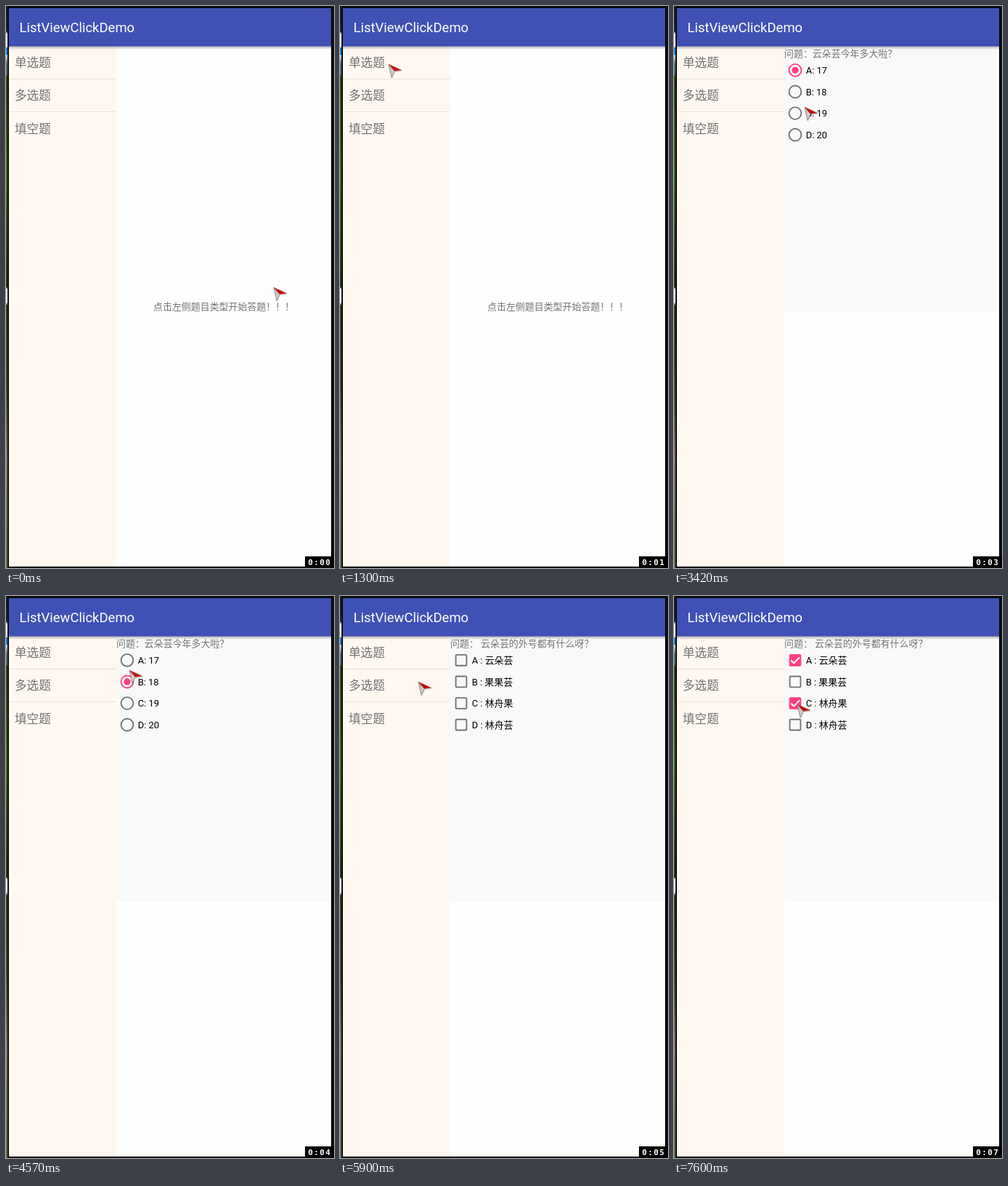
These frames come from a looping animation (452 by 773 pixels, 8 s). An HTML page:

```html
<!DOCTYPE html>
<html lang="zh-CN">
<head>
<meta charset="utf-8">
<title>ListViewClickDemo</title>
<style>
  html, body { margin: 0; width: 100%; height: 100%; overflow: hidden; background: #0b0c0f; }
  svg { display: block; }
  text { font: 12.94px Roboto, "Noto Sans CJK SC", sans-serif; fill: #737373; white-space: pre; }
  .mark { font-family: "Noto Sans CJK TC", "Noto Sans CJK SC", sans-serif; }
  .title { font-size: 18.48px; fill: #fff; }
  .item { font-size: 16.63px; }
  .option { fill: #000; }
  .clock { font: bold 11px "DejaVu Sans Mono", monospace; letter-spacing: 1.4px; fill: #fff; }
  .box { fill: none; stroke: #737373; stroke-width: 1.85; }
  .on .box { stroke: #ff4081; }
  .on .square { fill: #ff4081; }
  .dot { fill: #ff4081; }
  .tick { fill: none; stroke: #fff; stroke-width: 1.9; }
  .dot, .tick { visibility: hidden; }
  .on .dot, .on .tick { visibility: inherit; }
</style>
</head>
<body>
<svg id="stage" width="452" height="773" viewBox="0 0 452 773">
  <defs>
    <linearGradient id="desk" x2="0" y2="1">
      <stop offset="0" stop-color="#17191c"/>
      <stop offset=".045" stop-color="#22262a"/>
      <stop offset=".05" stop-color="#e8eef4"/>
      <stop offset=".073" stop-color="#e8eef4"/>
      <stop offset=".074" stop-color="#1584e0"/>
      <stop offset=".086" stop-color="#1584e0"/>
      <stop offset=".088" stop-color="#d5dde2"/>
      <stop offset=".103" stop-color="#54757a"/>
      <stop offset=".122" stop-color="#54757a"/>
      <stop offset=".125" stop-color="#2c4a08"/>
      <stop offset=".3" stop-color="#3c6a0c"/>
      <stop offset=".5" stop-color="#26380e"/>
      <stop offset=".504" stop-color="#f4f4f4"/>
      <stop offset=".527" stop-color="#f4f4f4"/>
      <stop offset=".533" stop-color="#30400f"/>
      <stop offset=".68" stop-color="#4a4a28"/>
      <stop offset=".8" stop-color="#8a7468"/>
      <stop offset="1" stop-color="#62704a"/>
    </linearGradient>
    <linearGradient id="shade" x2="0" y2="1">
      <stop offset="0" stop-opacity=".3"/>
      <stop offset="1" stop-opacity="0"/>
    </linearGradient>
    <linearGradient id="silver" x2="1" y2="0">
      <stop offset="0" stop-color="#b9b0b0"/>
      <stop offset="1" stop-color="#e6dede"/>
    </linearGradient>
  </defs>
  <rect width="2" height="773" fill="url(#desk)"/>
  <rect x="4" y="3" width="444" height="768" fill="#fefefe"/>
  <rect x="4" y="55" width="148" height="716" fill="#fef8f1"/>
  <path d="M4 100.5H152M4 145.5H152" stroke="#e9e3dc"/>
  <rect id="panel" x="152" y="55" width="296" height="365" fill="#f9f9f9"/>
  <rect x="4" y="55" width="444" height="5" fill="url(#shade)"/>
  <rect x="4" y="3" width="444" height="52.5" fill="#3f51b5"/>
  <text class="title" x="18.5" y="36.3">ListViewClickDemo</text>
  <g id="list"></g>
  <g id="intro"></g>
  <g id="single"></g>
  <g id="multi"></g>
  <circle id="ripple" cx="167" r="15"/>
  <g id="cursor">
    <path d="M0 0L18 8.5L8 10L4 19Z" fill="#000" opacity=".16" transform="translate(1 1)"/>
    <path d="M0 0L8 9.5L4 18.5Z" fill="url(#silver)" stroke="#8d7c7c" stroke-width=".8"/>
    <path d="M0 0L18 8.3L8 9.5Z" fill="#c00d0d" stroke="#b86a6a" stroke-width=".6"/>
  </g>
  <rect x="412" y="757" width="40" height="16" fill="#000"/>
  <text id="clock" class="clock" x="416.3" y="769">0:00</text>
</svg>
<script>
const $ = id => document.getElementById(id);
const LOOP = 8000;
const rowY = i => 88.3 + 29.6 * i;

// Full-width punctuation sits centred in its cell.
const label = (cls, x, y, text) =>
  `<text class="${cls}" x="${x}" y="${y}">` +
  text.replace(/[：！？]+/g, m => `<tspan class="mark">${m}</tspan>`) + '</text>';

const radio = '<circle class="box" r="8.4"/><circle class="dot" r="4.6"/>';
const check = '<rect class="box square" x="-7.4" y="-7.4" width="14.8" height="14.8" rx="1"/>' +
  '<path class="tick" d="M-5.8 .2L-1.9 4L5.9 -3.8"/>';

const quiz = (question, options, shape) => label('', 152, 70, question) +
  options.map((text, i) =>
    `<g class="row"><g transform="translate(167 ${rowY(i)})">${shape}</g>` +
    label('option', 181.7, rowY(i) + 4.8, text) + '</g>').join('');

$('list').innerHTML = ['单选题', '多选题', '填空题']
  .map((text, i) => label('item', 12, 84.2 + 45.2 * i, text)).join('');
$('intro').innerHTML = label('', 203, 418.4, '点击左侧题目类型开始答题！！！');
$('single').innerHTML = quiz('问题：云朵芸今年多大啦？',
  ['A: 17', 'B: 18', 'C: 19', 'D: 20'], radio);
$('multi').innerHTML = quiz('问题： 云朵芸的外号都有什么呀？',
  ['A : 云朵芸', 'B : 果果芸', 'C : 林舟果', 'D : 林舟芸'], check);

const times = [
  [0, 0, 1], [150, 1150, 9], [1300, 1300, 1], [1700, 2580, 8], [2730, 2730, 1],
  [2850, 3420, 5], [3540, 3840, 3], [3960, 4570, 6], [4690, 4930, 3],
  [5080, 5900, 6], [6020, 6120, 2], [6270, 7210, 8], [7330, 7600, 3]
].flatMap(([a, b, n]) =>
  Array.from({ length: n }, (_, i) => n > 1 ? a + (b - a) * i / (n - 1) : a));

// Pointer tip: [time, x, y].
const path = [
  [0, 369, 387], [100, 369, 387], [1150, 67, 81], [1300, 67, 80],
  [1700, 58, 77], [1960, 60, 78], [2580, 172, 85], [2850, 170, 84],
  [3050, 170, 85], [3420, 180, 139], [3840, 174, 136], [4080, 171, 112],
  [4326, 171, 111], [4570, 170, 102], [4930, 104, 117], [5240, 86, 119],
  [5600, 87, 119], [5900, 108, 118], [6120, 160, 92], [6270, 169, 87],
  [6700, 169, 88], [7210, 172, 147], [7600, 170, 149], [LOOP, 170, 149]
];

// Taps on a button: [time, row].
const ripples = [[2850, 0], [4082, 1], [7330, 2]];
const RIPPLE = 400;

function pointer(t) {
  const i = Math.max(1, path.findIndex(p => p[0] >= t));
  const [t0, x0, y0] = path[i - 1], [t1, x1, y1] = path[i];
  const u = (t - t0) / (t1 - t0), k = u * u * (3 - 2 * u);
  return [x0 + (x1 - x0) * k, y0 + (y1 - y0) * k];
}

const show = (id, on) => $(id).setAttribute('visibility', on ? 'visible' : 'hidden');

function mark(id, chosen) {
  $(id).querySelectorAll('.row').forEach((row, i) =>
    row.classList.toggle('on', chosen.includes(i)));
}

function draw(t) {
  const screen = t < 1950 ? 'intro' : t < 5400 ? 'single' : 'multi';
  for (const id of ['intro', 'single', 'multi']) show(id, id === screen);
  show('panel', screen !== 'intro');

  mark('single', t < 2990 ? [] : t < 4200 ? [0] : [1]);
  mark('multi', t < 6400 ? [] : t < 7460 ? [0] : [0, 2]);

  const tap = ripples.find(([at]) => t >= at && t < at + RIPPLE && t < 7600);
  show('ripple', tap);
  if (tap) {
    const u = (t - tap[0]) / RIPPLE;
    $('ripple').setAttribute('cy', rowY(tap[1]));
    $('ripple').setAttribute('fill-opacity', 0.12 * (1 - u));
  }

  $('cursor').setAttribute('transform', `translate(${pointer(t).map(Math.round)})`);
  $('clock').textContent = '0:0' + Math.floor(t / 1000);
}

let last = -1;
function tick() {
  const now = performance.now() % LOOP;
  const t = times.findLast(s => s <= now);
  if (t !== last) draw(last = t);
  requestAnimationFrame(tick);
}
tick();
</script>
</body>
</html>
```
